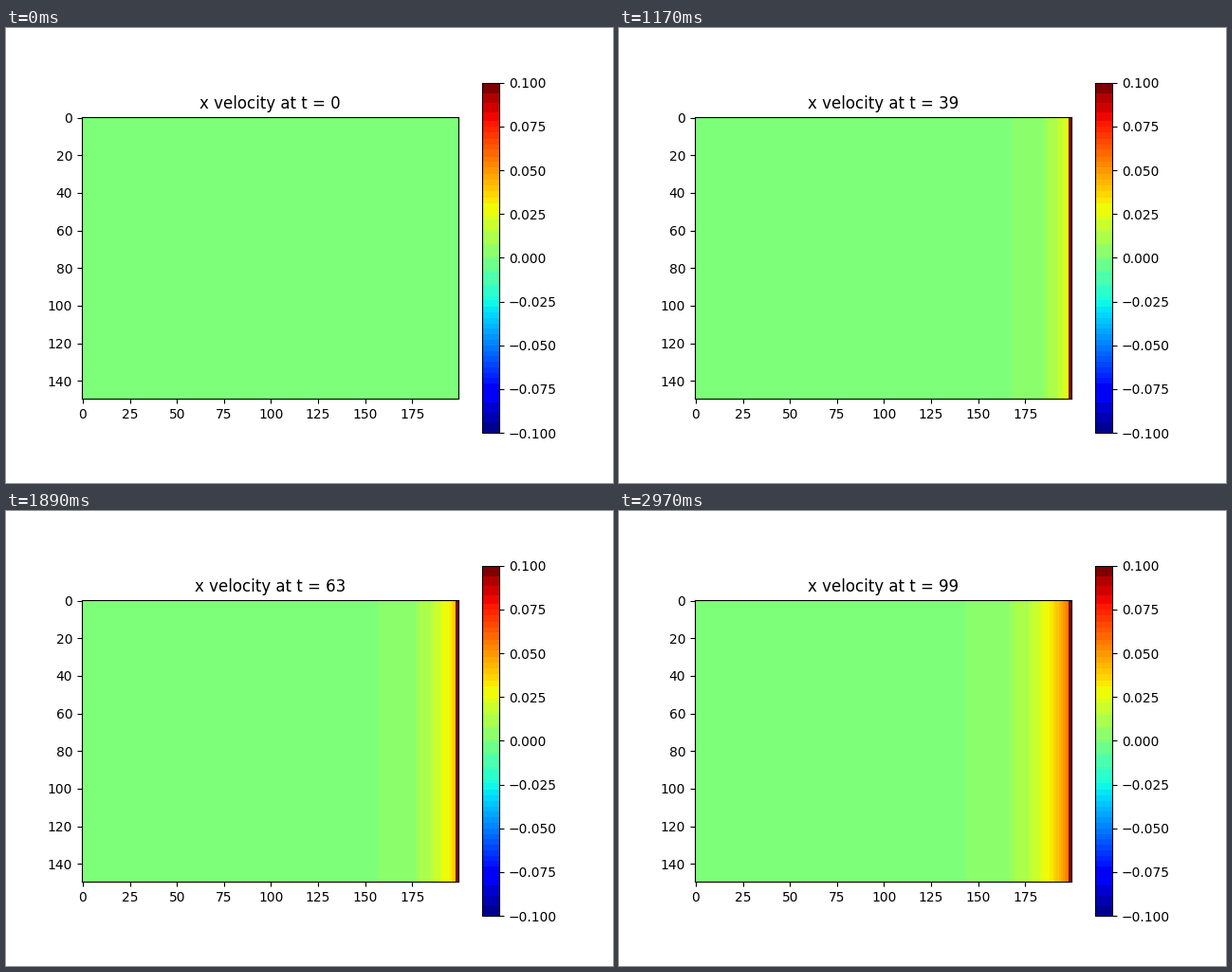
These frames come from a looping animation (640x480 px, 3000 ms). A matplotlib script:

```python
import numpy as np
import matplotlib.pyplot as plt
from matplotlib.animation import FuncAnimation
from matplotlib.colors import ListedColormap

NX, NY = 200, 150
STEPS = 100
WALL = 198      # first column held at the wall speed
SPEED = 0.1


def stepped_jet():
    """Jet reduced to flat bands: every colour takes the mean of its RGB cell."""
    rgb = np.round(plt.get_cmap("jet")(np.arange(256))[:, :3] * 255)
    cells = rgb // np.array([32, 16, 32])
    _, band = np.unique(cells, axis=0, return_inverse=True)
    band = band.ravel()
    out = np.array([rgb[band == b].mean(axis=0) for b in band])
    for level in (128, 255):    # rest and wall speed keep their pure colour
        out[band == band[level]] = rgb[level]
    return ListedColormap(out / 255)


def velocity(t):
    """Speed spreading from the right wall into fluid at rest."""
    cols = np.arange(NX)
    s = (WALL - cols) / np.sqrt(max(t, 1))
    u = 0.00185 * t**0.75 * np.exp(-0.56 * s - 0.037 * s**2)
    if t > 0:
        u[WALL:] = SPEED
    return np.tile(u, (NY, 1))


cmap = stepped_jet()
fig, ax = plt.subplots(figsize=(6.4, 4.8), dpi=100)
ax.set_facecolor(cmap(128))
img = ax.imshow(velocity(0), cmap=cmap, vmin=-SPEED, vmax=SPEED,
                interpolation="nearest", extent=(0, NX, NY - 0.5, -0.5))
ax.set_xlim(-0.5, NX - 0.5)
ax.set_xticks(range(0, NX, 25))
ax.set_yticks(range(0, NY, 20))
fig.colorbar(img, ax=ax)
title = ax.set_title("x velocity at t = 0")


def update(t):
    img.set_data(velocity(t))
    title.set_text(f"x velocity at t = {t}")
    return img, title


anim = FuncAnimation(fig, update, frames=STEPS, interval=30, repeat=True,
                     repeat_delay=0, blit=False)
plt.show()
```
